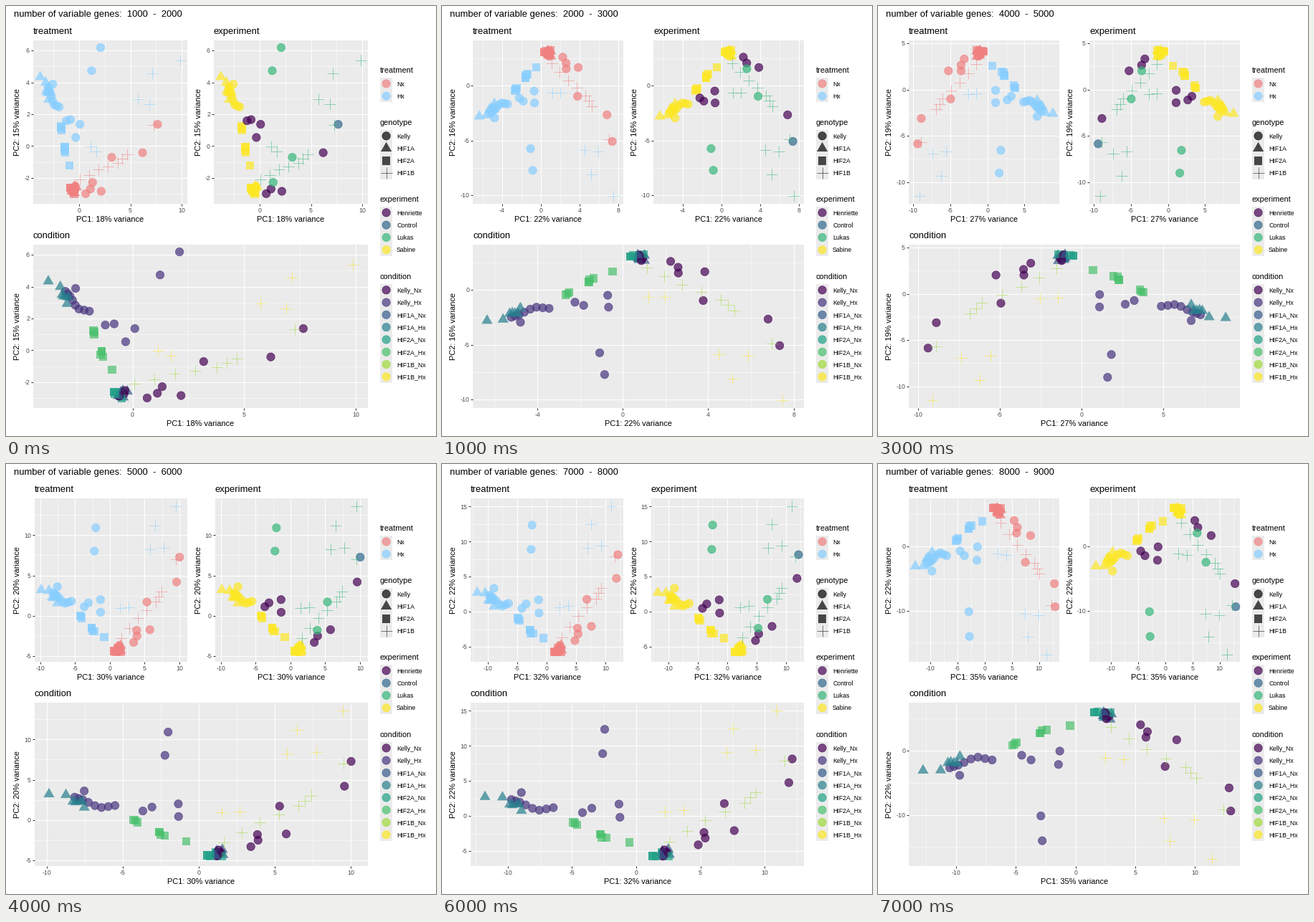
A matplotlib script for the animation above (8 s loop, 600x600 px).

```python
import matplotlib.pyplot as plt
import numpy as np
from matplotlib.animation import FuncAnimation
from matplotlib.collections import PathCollection
from matplotlib.colors import to_rgba
from matplotlib.patches import Rectangle
from matplotlib.path import Path

PX = 0.72  # points per pixel at 100 dpi
RIGHT, WIDE_TOP, SMALL_TOP, HEIGHT = 505, 333, 48, 228
GREY = "#EBEBEB"

TREATMENT = {"Nx": "#F08080", "Hx": "#87CEFF"}
GENOTYPES = ["Kelly", "HIF1A", "HIF2A", "HIF1B"]
EXPERIMENT = {"Henriette": "#440154", "Control": "#31688E",
              "Lukas": "#35B779", "Sabine": "#FDE725"}
CONDITION = {"Kelly_Nx": "#440154", "Kelly_Hx": "#46337E",
             "HIF1A_Nx": "#365C8D", "HIF1A_Hx": "#277F8E",
             "HIF2A_Nx": "#1FA187", "HIF2A_Hx": "#4AC16D",
             "HIF1B_Nx": "#9FDA3A", "HIF1B_Hx": "#FDE725"}

rng = np.random.default_rng(7)


def blob(n, center, spread):
    return np.clip(rng.normal(0, 1, (n, 2)), -1.5, 1.5) * spread + center


def trail(n, *knots):
    """Spread n points evenly along a line through the knots."""
    at = np.linspace(0, len(knots) - 1, n)
    return np.column_stack([np.interp(at, range(len(knots)), axis)
                            for axis in zip(*knots)])


# One layout in fractions of the panel: (condition, experiment, points)
LAYOUT = [
    ("Kelly_Nx", "Sabine", blob(6, (0.556, 0.08), (0.014, 0.016))),
    ("HIF1A_Nx", "Sabine", blob(6, (0.568, 0.09), (0.014, 0.02))),
    ("HIF2A_Nx", "Sabine", blob(7, (0.548, 0.075), (0.018, 0.014))),
    ("HIF1A_Hx", "Sabine", trail(2, (0.045, 0.455), (0.096, 0.45))),
    ("HIF1A_Hx", "Sabine", blob(5, (0.132, 0.405), (0.013, 0.025))),
    ("Kelly_Hx", "Sabine", trail(8, (0.122, 0.435), (0.15, 0.415),
                                 (0.195, 0.365), (0.243, 0.38))),
    ("Kelly_Hx", "Sabine", [(0.152, 0.475)]),
    ("HIF2A_Hx", "Sabine", blob(3, (0.303, 0.28), (0.008, 0.006))),
    ("HIF2A_Hx", "Sabine", blob(4, (0.376, 0.2), (0.011, 0.016))),
    ("HIF2A_Hx", "Sabine", [(0.457, 0.155)]),
    ("Kelly_Hx", "Henriette", trail(2, (0.327, 0.345), (0.355, 0.37))),
    ("Kelly_Hx", "Henriette", trail(2, (0.435, 0.31), (0.435, 0.39))),
    ("Kelly_Hx", "Lukas", trail(2, (0.409, 0.845), (0.398, 0.698))),
    ("Kelly_Nx", "Control", [(0.955, 0.644)]),
    ("Kelly_Nx", "Henriette", trail(3, (0.655, 0.125), (0.677, 0.165),
                                    (0.763, 0.205))),
    ("Kelly_Nx", "Henriette", [(0.937, 0.495)]),
    ("Kelly_Nx", "Lukas", trail(2, (0.675, 0.2), (0.742, 0.375))),
    ("HIF1B_Nx", "Lukas", trail(7, (0.572, 0.15), (0.682, 0.275),
                                (0.8, 0.375), (0.837, 0.44))),
    ("HIF1B_Nx", "Lukas", [(0.932, 0.633)]),
    ("HIF1B_Hx", "Lukas", trail(2, (0.566, 0.336), (0.621, 0.34))),
    ("HIF1B_Hx", "Lukas", trail(2, (0.763, 0.696), (0.851, 0.705))),
    ("HIF1B_Hx", "Lukas", trail(2, (0.791, 0.842), (0.927, 0.953))),
]
POINTS = np.vstack([pts for *_, pts in LAYOUT])
SAMPLES = [(list(CONDITION).index(c), e) for c, e, pts in LAYOUT for _ in pts]
sabine = [i for i, s in enumerate(SAMPLES) if s[1] == "Sabine"]
ORDER = [*rng.permutation(sabine), *range(len(sabine), len(SAMPLES))]

# Four landmarks: left tip, dense cluster, high circle, far cross.
# The layout is warped so that they drift from one key pose to the next.
HOME = np.array([(0.045, 0.455), (0.556, 0.08), (0.409, 0.845), (0.927, 0.953)])
KEY_POSES = [0, 1, 7]
KEYS = np.array([
    [(0.045, 0.776), (0.265, 0.085), (0.437, 0.956), (0.955, 0.877)],
    [(0.043, 0.465), (0.507, 0.077), (0.398, 0.795), (0.935, 0.953)],
    [(0.043, 0.415), (0.597, 0.077), (0.403, 0.845), (0.916, 0.954)]])


def bilinear(p):
    u, v = p.T
    return np.column_stack([np.ones_like(u), u, v, u * v])


def positions(i, flip):
    flat = KEYS.reshape(len(KEYS), -1)
    marks = np.array([np.interp(i, KEY_POSES, col) for col in flat.T])
    coef = np.linalg.solve(bilinear(HOME), marks.reshape(4, 2))
    pts = bilinear(POINTS) @ coef
    for axis, name in enumerate("xy"):
        if name in flip:
            pts[:, axis] = 1 - pts[:, axis]
    return pts


# Left edge, mirrored axes, explained variance, (low, high, tick step) of x and y
POSES = [
    (38, "", (18, 15), (-4.44, 10.53, 5), (-3.62, 6.63, 2)),
    (43, "y", (22, 16), (-7.02, 8.48, 4), (-10.76, 4.14, 5)),
    (43, "y", (25, 18), (-8.35, 9.5, 5), (-11.5, 4.7, 5)),
    (43, "xy", (27, 19), (-10.55, 9.67, 5), (-12.36, 5.31, 5)),
    (40, "", (30, 20), (-10.79, 11.14, 5), (-5.73, 14.58, 5)),
    (40, "", (30, 21), (-11.85, 12.1, 5), (-6.4, 15.4, 5)),
    (40, "", (32, 22), (-12.9, 13.07, 5), (-7.12, 16.17, 5)),
    (43, "y", (35, 22), (-13.94, 13.75, 5), (-17.96, 7.43, 10)),
]

# Marker outlines in pixels, y pointing down
R = 5.69
angle = np.linspace(0, 2 * np.pi, 33)
DISC = R * np.column_stack([np.cos(angle), np.sin(angle)])
TRIANGLE = R * np.array([(0, -1.55), (1.34, 0.775), (-1.34, 0.775), (0, -1.55)])
SQUARE = R * np.array([(-1, -1), (1, -1), (1, 1), (-1, 1), (-1, -1)])
PLUS = R * np.sqrt(2) * np.array([(-1, 0), (1, 0), (0, -1), (0, 1)])
SHAPES = [DISC, TRIANGLE, SQUARE, PLUS]

plt.rcParams["font.family"] = "Liberation Sans"
fig = plt.figure(figsize=(6, 6), dpi=100, facecolor="white")
ax = fig.add_axes([0, 0, 1, 1])


def write(x, y, text, size, color="black", ha="left", rotation=0):
    ax.text(x, y, text, fontsize=size * PX, color=color, ha=ha, va="baseline",
            rotation=rotation, rotation_mode="anchor")


def line(xs, ys, width, color, z):
    ax.plot(xs, ys, color=color, lw=width * PX, zorder=z, solid_capstyle="butt")


def box(x, y, w, h):
    ax.add_patch(Rectangle((x, y), w, h, fc=GREY, lw=0, zorder=0))


def markers(items):
    """Draw (x, y, shape index, colour) items in order."""
    paths, faces, edges, widths = [], [], [], []
    for x, y, kind, color in items:
        rgba = to_rgba(color, 0.7)
        outlined = kind in (0, 3)
        paths.append(Path(SHAPES[kind] + (x, y), [1, 2, 1, 2] if kind == 3 else None))
        faces.append("none" if kind == 3 else rgba)
        edges.append(rgba if outlined else "none")
        widths.append(0.71 * PX if outlined else 0)
    ax.add_collection(PathCollection(paths, facecolors=faces, edgecolors=edges,
                                     linewidths=widths, zorder=4), autolim=False)


def ticks(low, high, step):
    """Yield (value, fraction, is_major) for the grid lines inside the panel."""
    half = step / 2
    for k in range(int(np.ceil(low / half)), int(high / half) + 1):
        yield k * half, (k * half - low) / (high - low), k % 2 == 0


def panel(title, pose, pts, left, right, top, colors):
    first_left, _, (pc1, pc2), x_axis, y_axis = pose
    width, bottom = right - left, top + HEIGHT
    box(left, top, width, HEIGHT)
    for value, frac, major in ticks(*x_axis):
        x = left + frac * width
        line([x, x], [top, bottom], 1.07 if major else 0.53, "white", 1 + major)
        if major:
            line([x, x], [bottom, bottom + 2.75], 1, "#333333", 3)
            write(x, bottom + 12, f"{value:g}", 8.8, "#4D4D4D", "center")
    for value, frac, major in ticks(*y_axis):
        y = bottom - frac * HEIGHT
        line([left, right], [y, y], 1.07 if major else 0.53, "white", 1 + major)
        if major:
            line([left - 2.75, left], [y, y], 1, "#333333", 3)
            write(left - 5, y + 3.1, f"{value:g}", 8.8, "#4D4D4D", "right")
    write(left, top - 9, title, 13)
    write((left + right) / 2, bottom + 25, f"PC1: {pc1}% variance", 11, ha="center")
    write(left - first_left + 19.5, top + HEIGHT / 2, f"PC2: {pc2}% variance", 11,
          ha="center", rotation=90)
    markers([(left + pts[i, 0] * width, bottom - pts[i, 1] * HEIGHT,
              SAMPLES[i][0] // 2, colors[i]) for i in ORDER])


def legend(title, y, labels, colors, kinds):
    write(522, y, title, 11)
    top, step = y + 6.7, 17.28
    box(522, top, step, step * len(labels))
    centers = [top + step * (k + 0.5) for k in range(len(labels))]
    markers([(530.6, c, kind, color)
             for c, kind, color in zip(centers, kinds, colors)])
    for c, label in zip(centers, labels):
        write(545, c + 3.2, label, 8.8)


def swatches(title, y, palette):
    legend(title, y, list(palette), palette.values(), [0] * len(palette))


by_treatment, by_condition = list(TREATMENT.values()), list(CONDITION.values())
TREATMENT_COLORS = [by_treatment[c % 2] for c, _ in SAMPLES]
EXPERIMENT_COLORS = [EXPERIMENT[e] for _, e in SAMPLES]
CONDITION_COLORS = [by_condition[c] for c, _ in SAMPLES]


def draw(i):
    ax.clear()
    ax.set_axis_off()
    ax.set_autoscale_on(False)
    ax.set(xlim=(0, 600), ylim=(600, 0))
    pose = POSES[i]
    left, flip = pose[:2]
    pts = positions(i, flip)
    write(11, 15, f"number of variable genes:  {1000 * (i + 1)}  -  {1000 * (i + 2)}", 13)
    panel("treatment", pose, pts, left, 253, SMALL_TOP, TREATMENT_COLORS)
    panel("experiment", pose, pts, left + 252, RIGHT, SMALL_TOP, EXPERIMENT_COLORS)
    panel("condition", pose, pts, left, RIGHT, WIDE_TOP, CONDITION_COLORS)
    swatches("treatment", 93, TREATMENT)
    legend("genotype", 166, GENOTYPES, ["black"] * 4, range(4))
    swatches("experiment", 273, EXPERIMENT)
    swatches("condition", 381, CONDITION)
    return []


anim = FuncAnimation(fig, draw, frames=len(POSES), interval=1000,
                     init_func=lambda: [], repeat=True, repeat_delay=0)
plt.show()
```
